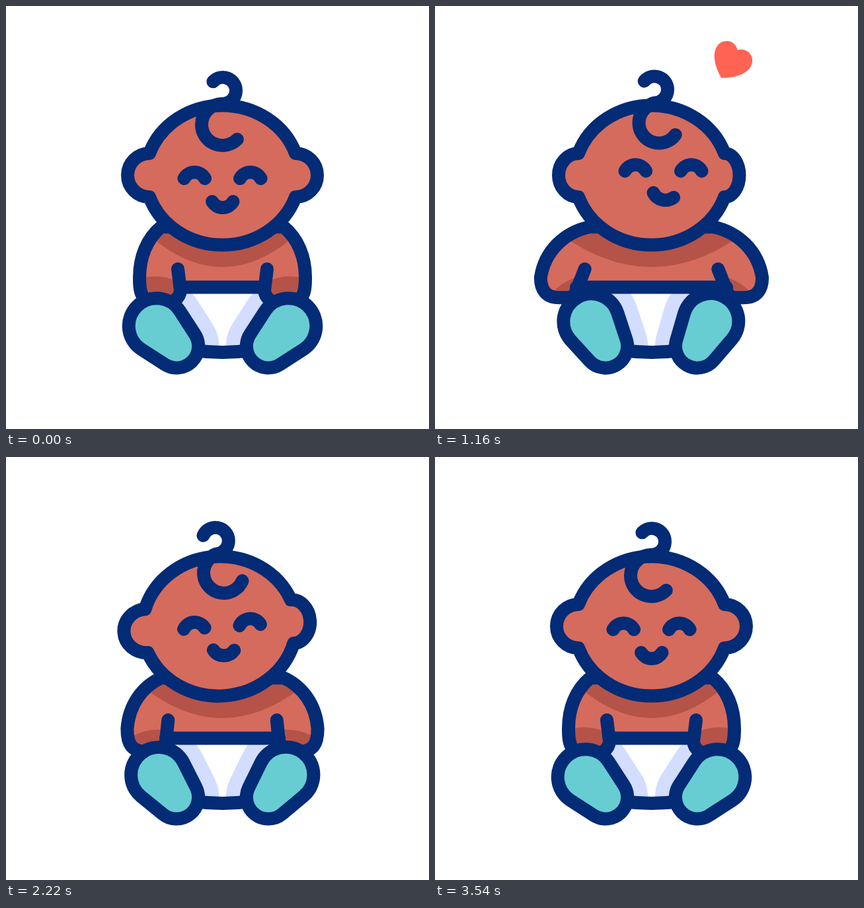
Write an HTML page that moves like this. It is 640 px wide and 640 px high and loops after 3600 ms.

```html
<!DOCTYPE html>
<html>
<head>
<meta charset="utf-8">
<style>
html, body { margin: 0; width: 100%; height: 100%; overflow: hidden; background: #fff; }
svg { display: block; width: 100vw; height: 100vh; }
.line { fill: none; stroke: #032b76; stroke-width: 20; stroke-linecap: round; stroke-linejoin: round; }
.skin { fill: #d56b5c; }
.sock { fill: #68cdd2; }
.shade { fill: #b55348; }
.lilac { fill: none; stroke: #d3ddff; stroke-width: 62; }
</style>
</head>
<body>
<svg viewBox="0 0 640 640">
  <defs>
    <clipPath id="bodyClip"><path class="torso"/></clipPath>
    <clipPath id="diaperClip"><path d="M258 425H397L370 521Q327.5 527 285 521Z"/></clipPath>
  </defs>
  <path class="torso skin"/>
  <g class="shade" clip-path="url(#bodyClip)">
    <path id="neck"/><path id="cuffL"/><path id="cuffR"/>
  </g>
  <g clip-path="url(#diaperClip)">
    <path fill="#fff" d="M250 420H405V530H250Z"/>
    <path class="lilac foot left"/><path class="lilac foot right"/>
  </g>
  <path class="line" d="M285 521Q327.5 527 370 521"/>
  <path class="line" id="waist"/>
  <path class="line" id="armL"/><path class="line" id="armR"/>
  <path class="line sock foot left"/>
  <path class="line sock foot right"/>
  <g id="head">
    <path id="tuft" class="line"/>
    <path id="skull" class="line skin"/>
    <path id="curl" class="line"/>
    <g id="face" class="line">
      <path d="M269.5 261A17.8 17.8 0 0 1 301 261M354 261A17.8 17.8 0 0 1 385.5 261"/>
      <path id="mouth"/>
    </g>
  </g>
  <path id="heart" fill="#ff6354" d="M0 0C-14 -8 -30 -22 -30 -37A17 17 0 0 1 0 -49A17 17 0 0 1 30 -37C30 -22 14 -8 0 0Z"/>
</svg>
<script>
const LOOP = 3600, MID = 327.5;
const $ = id => document.getElementById(id);
const set = (id, name, value) => $(id).setAttribute(name, value);
const setAll = (css, name, value) =>
  document.querySelectorAll(css).forEach(el => el.setAttribute(name, value));

const ramp = (t, a, b) => Math.min(1, Math.max(0, (t - a) / (b - a)));
const ease = (t, a, b) => { const u = ramp(t, a, b); return u * u * (3 - 2 * u); };
const pulse = (t, a, b, c, d) => ease(t, a, b) - ease(t, c, d);

const polar = (x, y, r, deg) => {
  const a = deg * Math.PI / 180;
  return [x + r * Math.cos(a), y + r * Math.sin(a)];
};

// Left arm for a spread of 0 (down) to 1 (wide): shoulder, wrist, palm, waist, inner tip
function armPoints(a) {
  const wrist = [202 - 43 * a, 411], palm = [236 - 49 * a, 450 - 9 * a], waist = [264 - 51 * a, 430];
  const from = ([x, y], dx, dy) => [x + dx, y + dy];
  return [
    [235, 334], [213 - 18 * a, 352 - 10 * a], from(wrist, 6 * a, -31 - 9 * a), wrist,
    from(wrist, 0, 25 - 7 * a), from(palm, -31 + 11 * a, 0), palm,
    from(palm, 18, 0), from(waist, -1 - 4 * a, 12), waist, [260 - 34 * a, 398]
  ];
}
const cuffPoints = a =>
  [[200 - 26 * a, 413 + 25 * a], [232 - 42 * a, 403 + 13 * a], [262 - 41 * a, 418 - 10 * a]];

function place(points, lean, mirror) {
  const r = 2.5 * lean * Math.PI / 180, c = Math.cos(r), s = Math.sin(r);
  return points.map(([px, py]) => {
    const x = (px - MID) * (mirror ? -1 : 1), y = py - 350;
    return [MID + x * c - y * s, 350 + x * s + y * c + 2 * lean];
  });
}
const chain = p => `${p[0]}C${p.slice(1, 10).join(' ')}`;

function drawBody(arms, lean, footL, footR) {
  const [l, r] = [false, true].map(mirror => {
    const arm = place(armPoints(arms), lean, mirror);
    const cuff = place(cuffPoints(arms), lean, mirror);
    const k = mirror ? 'R' : 'L';
    set('arm' + k, 'd', `M${MID} 335L${chain(arm)}L${arm[10]}`);
    set('cuff' + k, 'd', `M${cuff[0]}Q${cuff[1]} ${cuff[2]}L${[9, 8, 6, 5, 4].map(i => arm[i]).join(' ')}Z`);
    return arm;
  });
  setAll('.torso', 'd', `M${chain(l)}L${chain(r.slice(0, 10).reverse())}Z`);
  set('waist', 'd', `M${l[9][0]} 425.5H${r[9][0]}`);
  const w = 106 + 24 * arms, x = MID - 10 * lean, y = 351 + 2 * lean;
  set('neck', 'd', `M${x - w} ${y}Q${x} ${y + 88} ${x + w} ${y}V310H${x - w}Z`);
  setAll('.left', 'transform', `translate(258 514.5) rotate(${footL})`);
  setAll('.right', 'transform', `translate(397 514.5) scale(-1 1) rotate(${footR})`);
}

function drawHead(tilt, turn, hair, sway) {
  set('head', 'transform', `rotate(${tilt} ${MID} 364)`);

  // The skull lags a little behind the ears
  const lag = -.6 * tilt, x0 = 217 + lag, x1 = 438 + lag;
  const earL = 33 - 3 * turn + lag, earR = 33 - 10.5 * turn - lag;
  set('skull', 'd', `M${x0} 223A117 108 0 0 1 ${x1} 223A${earR} 33 0 0 1 ${x1} 289` +
    `A117 108 0 0 1 ${x0} 289A${earL} 33 0 0 1 ${x0} 223Z`);

  const tx = 328 + 4 * sway, ty = 128 - 1.5 * sway;
  set('tuft', 'd', `M${polar(tx, ty, 20, 223 + 3.5 * tilt - 3 * hair)}A20 20 0 0 1 ${polar(tx, ty, 20, 0)}` +
    `A20 20 0 0 1 ${tx} ${ty + 20}L${MID} 148`);

  const cx = MID + 11.5 * hair - .7 * tilt, cy = 179.5 - 2.5 * hair + .3 * tilt, r = 31.5 - hair;
  set('curl', 'd', `M${polar(cx, cy, r, -90 - 20 * hair)}A${r} ${r} 0 0 0 ${polar(cx, cy, r, 180)}` +
    `A${r} ${r} 0 0 0 ${polar(cx, cy, r, 45 - 9 * hair + 2.5 * tilt)}`);

  set('face', 'transform', `translate(${18 * turn} ${-11.3 * turn})`);
  const bend = 18.2 + 2.5 * turn;
  set('mouth', 'd', `M312 296A${bend} ${bend} 0 0 0 343.5 296`);
  set('mouth', 'transform', `translate(0 ${1.4 * turn}) rotate(${13 * turn} ${MID} 296)`);
}

function drawHeart(t) {
  const size = 1.08 * (1 - (1 - ramp(t, 980, 1300)) ** 3) * (1 - ease(t, 1470, 1610));
  const rise = ease(t, 1060, 1460);
  set('heart', 'visibility', size > .01 ? 'visible' : 'hidden');
  set('heart', 'transform', `translate(${427 + 40 * rise} ${111 - 13 * rise}) rotate(30) scale(${size})`);
}

function draw(t) {
  const lean = pulse(t, 0, 460, 560, 860);
  const open = pulse(t, 740, 1200, 2150, 2275);
  const late = pulse(t, 2200, 2500, 2780, 3360);
  const flap = 1 + .1 * Math.sin(Math.PI * (t - 1160) / 660) ** 2;
  drawBody(open * flap - .03 * lean - .08 * late, lean,
    45 - 8 * lean + 15 * open + 9 * late,
    45 + 27 * lean + 17 * open + 10 * late);
  drawHead(
    -4 * pulse(t, 0, 460, 740, 1120) - 4.2 * pulse(t, 2120, 2250, 2780, 3360),
    ease(t, 0, 540) - ramp(t, 1160, 2800),
    pulse(t, 0, 400, 2780, 3360),
    pulse(t, 0, 760, 2220, 2780));
  drawHeart(t);
}

setAll('.foot', 'd', 'M-34.2 41.1A42 42 0 1 1 -34.2 -41.1L6.9 -32.3A33 33 0 0 1 6.9 32.3Z');
const start = performance.now();
function tick() {
  draw((performance.now() - start) % LOOP);
  requestAnimationFrame(tick);
}
tick();
</script>
</body>
</html>
```
